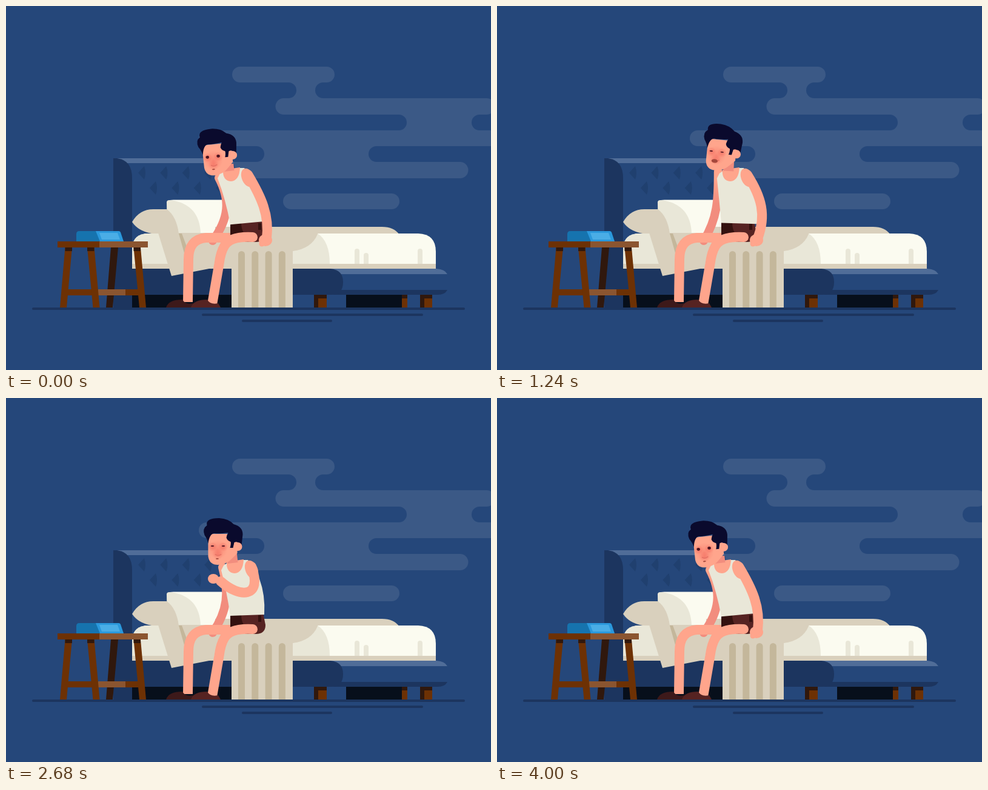
An HTML page with a canvas that plays this animation: 800x600 px, repeating every 4.04 s.

```html
<!DOCTYPE html>
<html lang="en">
<head>
<meta charset="utf-8">
<title>Sick morning</title>
<style>
html, body { margin: 0; width: 100%; height: 100%; overflow: hidden; background: #25477a; }
canvas { display: block; }
</style>
</head>
<body>
<canvas width="800" height="600"></canvas>
<script>
const ctx = document.querySelector('canvas').getContext('2d');
const LOOP = 4040, SNEEZE = 1300;
const NAVY = '#1c355f', BLUE = '#25477a', STEEL = '#506d98', BLACK = '#070f1b';
const WHITE = '#fbfbf0', CREAM = '#e9e7d8', TAN = '#d9d0bd', KHAKI = '#c4b79b';
const BROWN = '#6d3104', OAK = '#8b5530', DARK = '#30180d';
const SKIN = '#ffa58c', SHADE = '#f28d7e', HAIR = '#0a0a2d';
const MAROON = '#562322', WINE = '#34110f';

const fill = (color, d) => { ctx.fillStyle = color; ctx.fill(new Path2D(d)); };
const line = (color, width, d, cap = 'round') => {
  ctx.strokeStyle = color;
  ctx.lineWidth = width;
  ctx.lineCap = cap;
  ctx.stroke(new Path2D(d));
};
const rect = (color, x, y, w, h) => { ctx.fillStyle = color; ctx.fillRect(x, y, w, h); };
const oval = (color, x, y, rx, ry = rx, turn = 0) => {
  ctx.fillStyle = color;
  ctx.beginPath();
  ctx.ellipse(x, y, rx, ry, turn, 0, 7);
  ctx.fill();
};
const glow = (x, y, r, alpha) => {
  const g = ctx.createRadialGradient(x, y, 0, x, y, r);
  g.addColorStop(0, `rgba(235,70,65,${alpha})`);
  g.addColorStop(1, 'rgba(235,70,65,0)');
  oval(g, x, y, r);
};
const mix = (a, b, k) => a + (b - a) * k;
const blend = (a, b, k) => a.map((v, i) => mix(v, b[i], k));

function drawRoom() {
  rect(BLUE, 0, 0, 800, 600);
  fill('#3b5986', `M386 100H529a13 13 0 0 1 0 26H523a13 13 0 0 0 0 26H793a13.5 13.5 0 0 1 0 27
    H781a13 13 0 0 0 0 26H800V231H611a13 13 0 0 0 0 26H749a13.5 13.5 0 0 1 0 27H360V257H413
    a13 13 0 0 0 0-26H331a13 13 0 0 1 0-26H648a13 13 0 0 0 0-26H458a13.5 13.5 0 0 1 0-27H466
    a13 13 0 0 0 0-26H386a13 13 0 0 1 0-26ZM470 309H636a13 13 0 0 1 0 26H470a13 13 0 0 1 0-26Z`);
  line(NAVY, 4, 'M45 499H755M325 509H686M391 519H536');
}

function drawHeadboard() {
  fill(BLUE, 'M185 251H362Q378 252 378 272V433H185Z');
  fill(STEEL, 'M183 251H362Q372 251 376 259H190Z');
  fill(NAVY, 'M177 251H183Q208 254 208 284V497H177Z');
  for (let row = 0; row < 2; row++)
    for (let col = 0; col < 4; col++)
      fill('#20406f', `M${218 + row * 19 + col * 36.4} ${275 + row * 25}l10-11q4 11 0 22Z`);
}

function drawBedLeg(x, dark, light) {
  rect(DARK, x, 476, dark + light, 21);
  rect(BROWN, x + dark, 482, light, 15);
}

function drawBedBase() {
  rect(BLACK, 208, 476, 165, 21);
  rect(BLACK, 561, 476, 92, 21);
  drawBedLeg(508, 7, 14);
  drawBedLeg(653, 0, 9);
  drawBedLeg(683, 7, 13);
  fill(BLUE, 'M535 433H710Q724 433 728 442V468H540Z');
  fill(STEEL, 'M530 433H710Q724 434 728 442H540Z');
  fill(NAVY, 'M540 468H728Q724 476 712 476H540Z');
  fill(NAVY, 'M208 433H535Q556 435 556 455Q556 475 538 476H208Z');
}

function drawBedding() {
  fill(TAN, 'M410 364H620Q640 364 649 377H410Z');
  fill(WHITE, 'M208 398Q210 375 235 375H680Q709 376 709 405V433H208Z');
  fill(CREAM, 'M208 398Q210 375 235 375H514Q534 388 534 425H208Z');
  rect(TAN, 208, 425, 501, 8);
  for (const [x, y] of [[575, 400], [590, 407], [679, 400]])
    fill(CREAM, `M${x} 425V${y + 4}a4 4 0 0 1 8 0V425Z`);

  fill(WHITE, 'M266 321Q270 319 280 319.5H375V376H270Z');
  fill(CREAM, 'M265 323Q265 320 272 320Q320 327 321 376H274Q264 345 265 323Z');
  fill(TAN, 'M208 356Q220 335 243 335H265Q281 346 285 375H240Q218 371 208 356Z');

  fill(TAN, 'M251 374H372V428L335 433L273 445Z');
  fill(KHAKI, 'M285 375H290L305 415V425H299Z');
  fill(TAN, 'M345 364H514V376Q504 400 473 404V497H372V410H345Z');
  for (let i = 0; i < 4; i++)
    fill(KHAKI, `M${383 + i * 22.3} 497V409.5a5.5 5.5 0 0 1 11 0V497Z`);
}

function drawTable() {
  fill(DARK, 'M173 398H185L176 497H165Z');
  rect(BROWN, 96, 467, 54, 10);
  rect(OAK, 152, 467, 45, 10);
  rect(BROWN, 197, 467, 28, 10);
  for (const [top, foot] of [[97.5, 89], [134, 143.5], [210.5, 220]]) {
    fill(BROWN, `M${top} 398h11.5L${foot + 11} 497h-11Z`);
    rect(DARK, top, 398, 11.5, 6);
  }
  rect(BROWN, 85, 388, 70, 10);
  rect(OAK, 154, 388, 80, 10);
  fill('#1673ae', 'M116 388V376Q116 371 121 371H152L157 388Z');
  fill('#2a98dc', 'M148 371H186Q188 371 189 373L194 388H155Z');
  fill('#4aade6', 'M154 374H184L188 385H158Z');
}

const drawSlipper = (color, x) =>
  fill(color, `M${x} 497q4-13 27-13q5 9 18 6l4 7Z`);

function drawLegs() {
  line(SKIN, 16, 'M380 382H330Q301 384 301 418L300 488', 'butt');
  drawSlipper('#3d191a', 264);
  fill(MAROON, 'M370 354H424L428 374Q428 389 412 389H370Z');
  fill(WINE, 'M370 356H388Q388 370 394 376L370 380Z');
  rect(WINE, 416, 358, 5, 11);
  line(SKIN, 16, 'M407 381Q369 379 360 396Q354 406 351.500 425L340.500 489');
  drawSlipper(MAROON, 305);
}

function poseAt(t) {
  const ramp = (from, to) => {
    const k = Math.min(1, Math.max(0, (t - from) / (to - from)));
    return k * k * (3 - 2 * k);
  };
  const inhale = ramp(200, 1060), burst = ramp(1200, 1330), recover = ramp(1560, 1880);
  const relax = ramp(2300, 2640), drop = ramp(2800, 3120);
  return {
    lean: -6 + 20.5 * inhale - 28.5 * burst + 4 * ramp(1330, 1560) + 12 * recover
      - 2 * relax - 8.5 * ramp(2800, 3360) + 2.5 * ramp(3360, LOOP),
    nod: burst - recover,
    open: 1 - ramp(600, 900) + recover - relax + drop,
    mouth: inhale - .5 * burst - .5 * ramp(1400, 1880),
    raised: recover - drop,
    lowered: relax - ramp(3120, 3360),
    rub: 5 * Math.sin((t - 2120) / 70) * (recover - relax)
  };
}

function drawFarArm(d) {
  const g = ctx.createLinearGradient(0, 285, 0, 325);
  g.addColorStop(0, SKIN);
  g.addColorStop(1, SHADE);
  line(g, 14, `M${357 + d} ${279 - d * .7}C${368 - d * .4} 320 ${366 - d * .3} 350 341 387`);
}

function drawShirt(d) {
  fill(CREAM, `M${359 + d} 276L${366 + d} 271L${392 + d} 267H${399 + d}Q${412 + d} 280 ${418 + d} 298
    Q${428 + d * .8} 325 ${426 + d * .4} ${357 + d * .3}L370 ${359 - d * .2}
    Q${364 + d * .3} 318 ${355 + d} 284Z`);
  fill(SKIN, `M${364 + d} 270Q${363 + d} 288 ${377 + d} 289Q${391 + d} 288 ${392 + d} 266Z`);
}

function drawHead({ lean, nod, open, mouth }) {
  const x = 365.5 + 1.1 * lean + .025 * lean * lean;
  const y = 270 - .42 * lean + 3 * nod;
  line(SHADE, 17, `M${x + 7} ${y - 12}L${374 + lean} 272`, 'butt');
  ctx.save();
  ctx.translate(x, y);
  ctx.rotate((lean - 8 * nod) * Math.PI / 180);
  fill(SKIN, 'M-32-46V-9Q-30 5-16 5Q-2 5 8-6L16-14V-46Z');
  glow(-16, -20, 16, .3);
  for (const ex of [-25, -7]) glow(ex, -25, 8, .4);
  glow(-16, -13, 9, .3);
  fill(HAIR, `M-32-30Q-33-37-38-44Q-42-55-34-60Q-37-72-14-72Q2-71 10-62Q25-58 25-45L23-27
    Q17-35 11-32L9-23H4Q6-30 5-33Q-1-35-2-40Q-1-45 1-48Q-14-46-22-47Q-30-46-32-30Z`);
  oval(SKIN, 17, -25, 7);
  for (const ex of [-25, -7]) oval('#4a1420', ex, -26, 2.8, .9 + 1.5 * open);
  line('#e87466', 2, 'M-20-12Q-16-9-11-12');
  oval('#a5483c', -17 - mouth, -5 - 6 * mouth, 2.5 + 3 * mouth, 1 + 2.5 * mouth);
  ctx.restore();
}

// Each arm pose: two curve controls, then the wrist
function drawNearArm({ lean: d, raised, lowered, rub }) {
  const rest = [428 + d * 1.1, 315, 439 + d * .7, 345, 430, 383];
  const nose = [422, 308, 366, 314, 345 + rub, 270];
  const chest = [424, 330, 385, 330, 354, 302];
  const arm = blend(rest, blend(nose, chest, lowered), raised);
  const [x, y] = arm.slice(4);
  const fx = x - mix(2, 12, raised), fy = y + mix(3, -4, raised);
  const thumb = 6 * (1 - raised);
  oval(SKIN, 405 + d, 283, 10, 16, -.4);
  line(SKIN, 16, `M${405 + d} 278C${arm}`);
  oval(SKIN, fx, fy, mix(11, 9, raised), mix(10, 8, raised));
  line(SKIN, 9, `M${fx} ${fy}l${-thumb} ${thumb}`);
}

function drawSpray(t) {
  const age = (t - SNEEZE) / 260;
  if (age < 0 || age > 1.65) return;
  let seed = 7;
  const rand = () => (seed = seed * 16807 % 2147483647) / 2147483647;
  ctx.fillStyle = '#4a9cd8';
  for (let jet = 0; jet < 4; jet++) {
    const angle = .13 + .33 * Math.sqrt(jet);
    const reach = 160 - 50 * Math.abs(jet - 1), length = 55 - 10 * jet;
    for (let i = 0; i < 20; i++) {
      const r = (reach + length * (rand() - .5)) * age;
      const off = (rand() - .5) * 4, size = .8 + rand() * .8;
      const x = 330 - r * Math.cos(angle) + off * Math.sin(angle);
      const y = 250 + r * Math.sin(angle) + off * Math.cos(angle);
      if (x < 318) ctx.fillRect(x, y, size, size);
    }
  }
}

const start = performance.now();

function frame() {
  const t = (performance.now() - start) % LOOP;
  const pose = poseAt(t);
  drawRoom();
  drawHeadboard();
  drawBedBase();
  drawBedding();
  drawTable();
  drawFarArm(pose.lean);
  drawLegs();
  drawShirt(pose.lean);
  drawHead(pose);
  drawNearArm(pose);
  drawSpray(t);
  requestAnimationFrame(frame);
}
frame();
</script>
</body>
</html>
```
